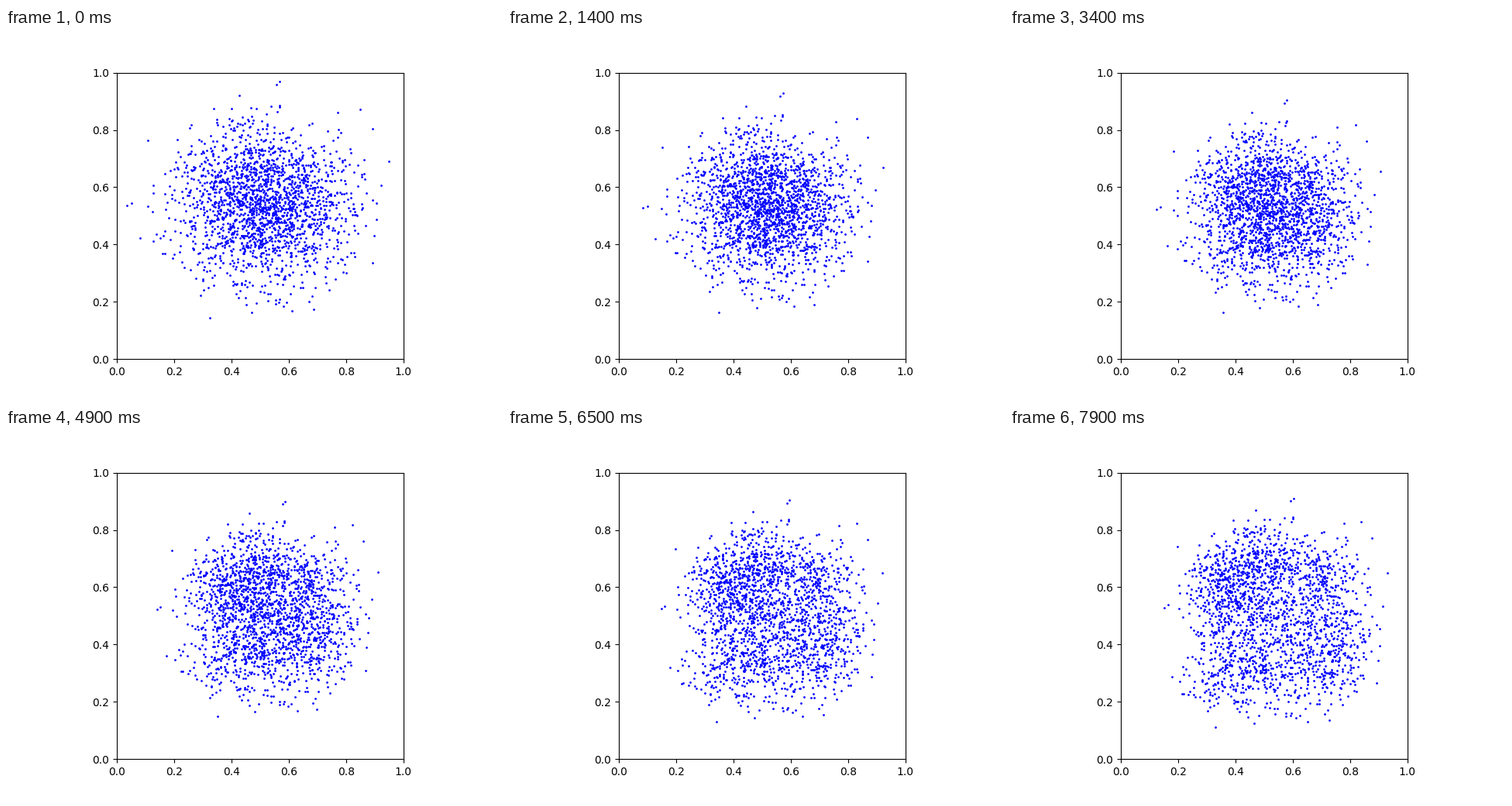
A matplotlib script that plays this animation: 640x480 px, repeating every 8000 ms.

```python
import numpy as np
import matplotlib.pyplot as plt
from matplotlib.animation import FuncAnimation

FRAMES, STEP = 80, 100
COUNT = 2000
LEFT, BOTTOM, SIDE = 143.2, 427.2, 369.6  # axes square in stage pixels

# A few far stragglers, stage pixels
STRAYS = [(353, 69), (349, 73), (301, 87), (268, 104), (183, 145), (156, 229),
          (162, 226), (173, 271), (263, 374), (317, 367), (369, 365),
          (397, 363), (473, 303), (484, 203), (494, 172), (473, 130),
          (457, 105), (428, 109)]


def make_cloud():
    rng = np.random.default_rng(7)
    z = rng.normal(size=(2 * COUNT, 2))
    z = z[np.hypot(*z.T) < 2.7][:COUNT - len(STRAYS)]
    return np.vstack([STRAYS, z * (56, 50) + (331, 230)])


def sigmoid(u):
    return 1 / (1 + np.exp(-u))


def inward(x, y):
    """Early pull towards the middle."""
    return np.column_stack([0.25 * (365 - x), 0.213 * (271 - y)])


def outward(x, y):
    """Later push that hollows out the middle."""
    core = 1 + 0.45 * np.exp(-((x - 343) ** 2 + (y - 227) ** 2) / 85 ** 2)

    low = sigmoid((y - 150) / 25)
    vx = (7 + 16 * low) * core * np.tanh((x - 343) / 38) + 8 - 7 * low
    vx += 19 * np.exp(-((x - 165) / 55) ** 2 - ((y - 245) / 50) ** 2)

    mid = 250 - 64 * sigmoid((x - 400) / 40)
    vy = core * (24 * np.tanh((y - mid) / 36) + 7)
    spread = np.where(y < 280, 25, 50)
    vy += 34 * np.exp(-((x - 175) / 80) ** 2 - ((y - 280) / spread) ** 2)
    return np.column_stack([vx, vy])


def ramp(t):
    """Starts near 2.3 s, then grows steadily."""
    return 0.45 * np.log1p(np.exp((t - 2.3) / 0.45)) / 5.6


start = make_cloud()
pull, push = inward(*start.T), outward(*start.T)


def positions(t):
    p = start + (1 - np.exp(-0.3 * t)) * pull + (ramp(t) - ramp(0)) * push + 0.4
    return (p[:, 0] - LEFT) / SIDE, (BOTTOM - p[:, 1]) / SIDE


fig, ax = plt.subplots(figsize=(6.4, 4.8), dpi=100)
ax.set(xlim=(0, 1), ylim=(0, 1), aspect="equal")
dots, = ax.plot(*positions(0), "o", color="blue", ms=1)


def update(i):
    dots.set_data(*positions(i * STEP / 1000))
    return dots,


anim = FuncAnimation(fig, update, frames=FRAMES, interval=STEP,
                     repeat=True, repeat_delay=0)
plt.show()
```
